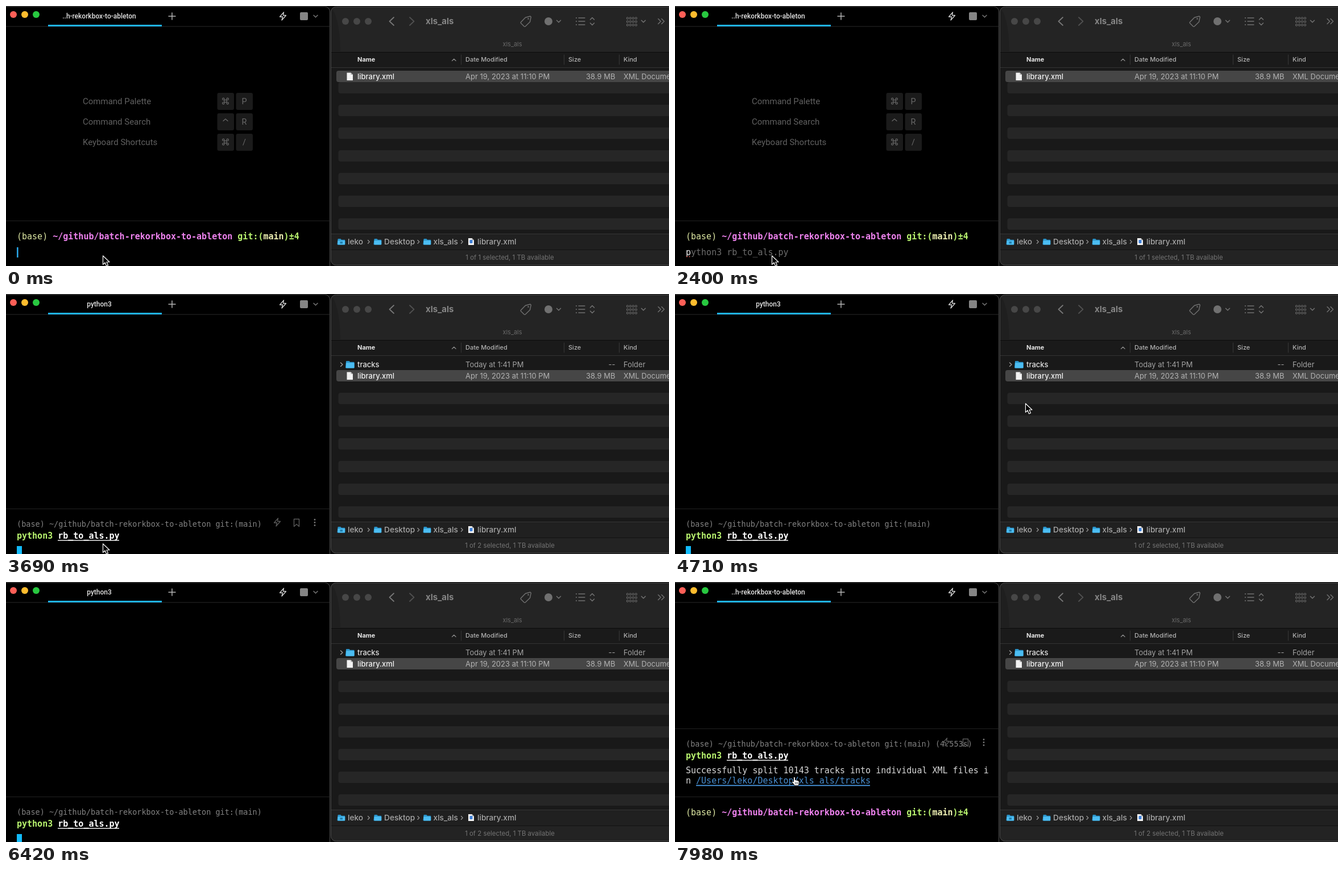
Write an HTML page that moves like this. It is 1166x458 px and loops after 8000 ms.

```html
<!DOCTYPE html>
<html lang="en">
<head>
<meta charset="utf-8">
<title>Terminal and file list</title>
<style>
html, body { margin: 0; width: 100%; height: 100%; overflow: hidden; background: #0b0b0b; }
svg { display: block; width: 1166px; height: 458px; }
text { white-space: pre; }
.ui { font-family: Inter, "Open Sans", sans-serif; }
.tab { font-family: Roboto, sans-serif; }
.mono { font-family: "DejaVu Sans Mono", monospace; font-size: 15px; }
.line { fill: none; stroke-linecap: round; stroke-linejoin: round; }
</style>
</head>
<body>
<svg id="stage" viewBox="0 0 1166 458" xmlns="http://www.w3.org/2000/svg"></svg>
<script>
const LOOP = 8000;
const T = { type: 2340, accept: 2610, enter: 2847, cursor: 3210, folder: 3420, leave: 4200, rest: 4650,
            hide: 5010, done: 7400, back: 7620 };
const USER = 'leko';
const PATH = '~/github/batch-rekorkbox-to-ableton';

const rect = (x, y, w, h, fill, r = 0, more = '') =>
  `<rect x="${x}" y="${y}" width="${w}" height="${h}" rx="${r}" fill="${fill}" ${more}/>`;
const text = (x, y, s, fill, size, cls = 'ui', more = '') =>
  `<text class="${cls}" x="${x}" y="${y}" fill="${fill}" style="font-size:${size}px" ${more}>${s}</text>`;
const line = (d, color, w = 1.4, more = '') =>
  `<path class="line" d="${d}" stroke="${color}" stroke-width="${w}" ${more}/>`;
const dot = (x, y, r, fill) => `<circle cx="${x}" cy="${y}" r="${r}" fill="${fill}"/>`;
const group = (id, body, hidden) => `<g id="${id}" ${hidden ? 'display="none"' : ''}>${body}</g>`;
const span = (s, fill, bold) =>
  `<tspan fill="${fill}" ${bold ? 'font-weight="700"' : ''}>${s}</tspan>`;
const mono = (x, y, body, more = '') => `<text class="mono" x="${x}" y="${y}" ${more}>${body}</text>`;
const MID = 'text-anchor="middle"', END = 'text-anchor="end"';
const down = (x, y, color) => line(`M${x - 3.5} ${y - 1.7}l3.5 3.5l3.5 -3.5`, color, 1.6);

const bolt = (x, y, color) =>
  line(`M${x + 1.5} ${y - 7}l-7 8h5l-1.5 6l7.5 -8.5h-5z`, color, 1.3);

function keyCap(x, y, label) {
  const cx = x + 14.5, cy = y + 14.5;
  let face;
  if (label === 'cmd') {
    const loop = (sx, sy) => `M${cx + sx * 2} ${cy + sy * 2}v${sy * 1.7}a1.7 1.7 0 1 ${sx * sy > 0 ? 0 : 1} ${sx * 1.7} ${-sy * 1.7}z`;
    face = line(loop(1, 1) + loop(1, -1) + loop(-1, 1) + loop(-1, -1) +
      `M${cx - 2} ${cy - 2}h4v4h-4z`, '#686868', 1.2);
  } else if (label === '^') {
    face = line(`M${cx - 4} ${cy - 1}l4 -3.5l4 3.5`, '#686868', 1.3);
  } else {
    face = text(cx, cy + 5, label, '#686868', 14.5, 'tab', MID);
  }
  return rect(x, y, 29.5, 30, '#1b1b1b', 3) + face;
}

const folder = (x, y, w, h) =>
  `<path d="M${x} ${y + 1}q0 -1 1 -1h${w * .33}l1.5 1.7h${w * .57 - 1.5}q1 0 1 1v${h - 3.7}q0 1 -1 1h${-w * .9 - 1}q-1 0 -1 -1z" fill="#2a94ca"/>` +
  rect(x, y + 3.2, w + .9 - w * .1 + 1, h - 3.2, '#4cbdf2', 1);

const sheet = (x, y, w, h) =>
  `<path d="M${x} ${y}h${w - 3.5}l3.5 3.5v${h - 3.5}h${-w}z" fill="#f2f2f2"/>` +
  `<path d="M${x + w - 3.5} ${y}v3.5h3.5z" fill="#a9a9a9"/>`;

function terminal() {
  const help = [['Command Palette', 'cmd', 'P'], ['Command Search', '^', 'R'], ['Keyboard Shortcuts', 'cmd', '/']];
  const helpRows = help.map(([label, a, b], i) => {
    const y = 153 + 36 * i;
    return text(135, y + 20, label, '#606060', 15, 'tab') + keyCap(371.5, y, a) + keyCap(404.5, y, b);
  }).join('');

  const prompt = mono(19, 411,
    span('(base) ', '#dfe9a4') + span(PATH, '#ee82ee', true) + span(' git:(', '#b9f46f', true) +
    span('main', '#f0f2b4', true) + span(')±4', '#b9f46f', true));

  const tools = bolt(477, 402, '#5a5a5a') +
    line('M506.5 396.5h9v13l-4.5 -4l-4.5 4z', '#5a5a5a', 1.4) +
    [397.5, 402.5, 407.5].map(y => dot(543, y, 1.4, '#747474')).join('');

  const block = line('M0 378.5H569', '#222222', 1) +
    mono(19, 410, span(`(base) ${PATH} git:(main)<tspan id="spent"></tspan>`, '#828282'), 'style="font-size:13.5px"') +
    mono(19, 431, span('python3 ', '#b9f46f', true) + span('rb_to_als.py', '#ffffff', true)) +
    rect(91, 433.3, 108, 1.4, '#ffffff') + group('tools', tools, true);

  const output = mono(19, 337, span('Successfully split 10143 tracks into individual XML files i', '#d8d8d8')) +
    mono(19, 355, span('n ', '#d8d8d8') + span(`/Users/${USER}/Desktop/xls_als/tracks`, '#4a8fd0')) +
    rect(37, 357.5, 306, 1.8, '#4a9ce8');

  const typed = mono(19, 439, span('p', '#f0f0f0') + span('ython3 rb_to_als.py', '#6c6c6c')) +
    line('M20 441.5H28', '#e8584f', 1.5, 'stroke-dasharray="2 2.5" style="stroke-linecap:butt"');
  const full = mono(19, 439, span('python3 ', '#b9f46f') + span('rb_to_als.py', '#f0f0f0')) +
    rect(91, 441, 108, 1.2, '#f0f0f0');

  return rect(-10, 1, 579.5, 470, '#000000', 9, 'stroke="#4c4c4c"') +
    line('M0 36H569', '#2b2b2b', 1) + rect(74, 33, 200, 3, '#1fb4f4') +
    dot(13, 15, 6, '#fe5f57') + dot(33, 15, 6, '#febc2e') + dot(53, 15, 6, '#28c840') +
    text(164, 22, '', '#e4e4e4', 12, 'tab', `id="title" font-weight="500" ${MID}`) +
    line('M286 18h12M292 12v12', '#b4b4b4', 1.5) + bolt(487, 18, '#d2d2d2') +
    rect(517, 11, 14, 14, '#858585', 2) + down(544.5, 18, '#737373') +
    group('help', helpRows) + group('block', block, true) + group('output', output, true) +
    group('prompt', line('M0 378.5H569', '#222222', 1) + prompt) +
    group('typed', typed, true) + group('full', full, true) +
    rect(19, 425, 2.6, 18, '#2aa5e6', 0, 'id="beam"') +
    rect(19, 444, 9, 14, '#12bbfb', 0, 'id="caret" display="none"');
}

function finder() {
  const gray = '#707070';
  const head = (x, s, bold) => text(x, 98, s, bold ? '#e6e6e6' : '#b2b2b2', 11, 'ui', `font-weight="${bold ? 700 : 500}"`);
  let stripes = '';
  for (let y = 134; y < 390; y += 40) stripes += rect(584.5, y, 600, 20, '#262626', 4);

  const cells = (y, name, date, size, kind, nameColor, color) =>
    text(618, y, name, nameColor, 13, 'ui', 'font-weight="500"') + text(808, y, date, color, 13) +
    text(1071.5, y, size, color, 13, 'ui', END) + text(1086, y, kind, color, 13);

  const file = rect(581, 114, 600, 20, '#464646', 4) + sheet(599.5, 117.5, 10.5, 13.5) +
    cells(129, 'library.xml', 'Apr 19, 2023 at 11:10 PM', '38.9 MB', 'XML Document', '#f2f2f2', '#b2b2b2');
  const tracks = line('M588.5 121l3.5 3.2l-3.5 3.2', '#a0a0a0', 1.4) + folder(598, 118, 14, 12.5) +
    cells(129, 'tracks', 'Today at 1:41 PM', '--', 'Folder', '#e2e2e2', '#a2a2a2');

  let grid = '';
  for (let i = 0; i < 4; i++)
    for (let j = 0; j < 3; j++)
      grid += rect(1091.5 + i * 5, 20 + j * 6, 3, 3, 'none', .6, `stroke="${gray}"`);
  const list = [21, 27, 33].map(y => dot(1003, y, 1.1, gray) + line(`M1007 ${y}h11`, gray, 1.3)).join('');

  const crumb = (x, s) => text(x, 420, s, '#a8a8a8', 13.7, 'ui', 'font-weight="500"');
  const next = x => line(`M${x - 1.5} 412.5l2.8 2.9l-2.8 2.9`, '#989898', 1.3);
  const crumbs = folder(583.5, 410, 12, 10.5) + rect(587.5, 415, 4.5, 3.5, '#217fae') + crumb(601, USER) + next(638) +
    folder(647.5, 410, 12, 10.5) + crumb(665, 'Desktop') + next(725.5) +
    folder(734.5, 410, 12, 10.5) + crumb(751.5, 'xls_als') + next(802) +
    sheet(813, 409, 10, 12) + rect(815.5, 412, 5, 6, '#3f80d8', 1) + crumb(829, 'library.xml');

  return `<clipPath id="win"><rect x="571.5" y="1" width="620" height="456" rx="9"/></clipPath>` +
    `<g clip-path="url(#win)">` +
    rect(571, 1, 595, 457, '#191919') + rect(571, 1, 595, 80, '#242424') +
    `<path d="M571 1Q587 20 588 80H571z" fill="#1f1f1f"/>` +
    rect(571, 81, 595, 27, '#1a1a1a') + stripes +
    line('M571 81.5H1166', '#0b0b0b', 1) + line('M571 108.5H1166', '#343434', 1) +
    [800.5, 981.5, 1078.5].map(x => line(`M${x} 86V103`, '#373737', 1)).join('') +
    rect(571, 401, 595, 57, '#202020') + line('M571 401.5H1166', '#363636', 1) +
    rect(571, 430, 595, 28, '#232323') + line('M571 429.5H1166', '#121212', 1) +
    '</g>' + rect(571.5, 1.5, 620, 455, 'none', 9, 'stroke="#4a4a4a"') +
    [597, 617, 637].map(x => dot(x, 27, 6, '#474747')).join('') +
    line('M682 20l-7.5 7l7.5 7', '#777777', 1.8) + line('M710 20l7.5 7l-7.5 7', '#505050', 1.8) +
    text(738, 32, 'xls_als', '#858585', 15, 'ui', 'font-weight="700"') +
    line('M905.5 28.5l8 -8.3l8.5 -2.2l1.3 1.3l-1.8 8.8l-8.2 7.9q-1 .8 -2 0l-5.8 -5.7q-.8 -.8 0 -1.8z', gray, 1.4) +
    dot(918.5, 22.5, 1.2, gray) +
    dot(954, 27, 7, gray) + down(972, 27, gray) + list +
    line('M1027.5 24l3.5 -3.5l3.5 3.5M1027.5 30l3.5 3.5l3.5 -3.5', gray, 1.6) +
    grid + down(1121, 27, gray) +
    line('M1147 22.5l4.5 4.5l-4.5 4.5M1153 22.5l4.5 4.5l-4.5 4.5', gray, 1.5) +
    text(890.5, 71, 'xls_als', '#6a6a6a', 11, 'ui', MID) +
    head(618, 'Name', true) + line('M784.5 96.5l3.3 -3.2l3.3 3.2', '#8c8c8c', 1.2) +
    head(808, 'Date Modified') + head(989, 'Size') + head(1086, 'Kind') +
    group('tracks', tracks, true) + group('file', file) + crumbs +
    text(886, 447, '', '#747474', 11.4, 'ui', `id="status" ${MID}`);
}

const pointer = group('arrow',
    '<path d="M.5 0V15.4L4.1 12L6.6 18L9.5 16.8L7 11H12z" fill="#000" stroke="#fff" stroke-width="1.2" stroke-linejoin="round"/>') +
  group('hand',
    '<path d="M3 9V1.8Q3 .3 4.4 .3T5.8 1.8V6Q7.4 5 8.2 6.4Q9.8 5.6 10.6 7.1Q12.8 6.6 12.8 9V11Q12.8 13.6 11.2 15.8H4.8Q3.9 13.4 1.2 11Q-.4 9.2 .9 8.4Q2 8 3 9z" fill="#fff" stroke="#000" stroke-width="1"/>' +
    line('M6.2 9.5v3.5M8.4 9.5v3.5M10.5 9.5v3.5', '#333', .8), true);

const stage = document.getElementById('stage');
stage.innerHTML = rect(0, 0, 1166, 458, '#0b0b0b') + terminal() + finder() + pointer;
const el = {};
stage.querySelectorAll('[id]').forEach(n => el[n.id] = n);

const show = (id, on) => el[id].setAttribute('display', on ? 'inline' : 'none');
const move = (id, x, y) => el[id].setAttribute('transform', `translate(${x} ${y})`);
const label = (id, s) => { if (el[id].textContent !== s) el[id].textContent = s; };
const ease = (t, a, b) => {
  const k = Math.min(1, Math.max(0, (t - a) / (b - a)));
  return k * k * (3 - 2 * k);
};

function pointerAt(t) {
  if (t < T.hide) {
    const k = ease(t, T.leave, T.rest);
    return [170 + 446 * k, 440 - 247 * k];
  }
  const k = ease(t, T.done, T.back);
  return [330 - 124.5 * k, 300 + 43 * k];
}

function draw(t) {
  const running = t >= T.enter && t < T.done, done = t >= T.done;
  const typing = t >= T.type && t < T.enter, hasFolder = t >= T.folder;
  const [x, y] = pointerAt(t);
  const seen = t < T.hide || done;
  const onLink = done && x < 343 && y > 338;

  label('title', running ? 'python3' : '..h-rekorkbox-to-ableton');
  label('spent', done ? ' (4.553s)' : '');
  label('status', `1 of ${hasFolder ? 2 : 1} selected, 1 TB available`);

  show('help', t < T.enter);
  show('prompt', !running);
  show('block', running || done);
  move('block', 0, done ? -120 : 0);
  show('output', done);
  show('tools', seen && x < 569 && y > (done ? 258 : 378));
  show('typed', typing && t < T.accept);
  show('full', typing && t >= T.accept);
  show('caret', running && t >= T.cursor);

  // The beam blinks with a one second period, restarted by the new prompt.
  const phase = done ? t - T.done : t + 280;
  show('beam', !running && phase % 1000 < 500);
  move('beam', !typing ? 0 : t < T.accept ? 9 : 180.6, 0);

  show('tracks', hasFolder);
  move('file', 0, hasFolder ? 20 : 0);

  show('arrow', seen && !onLink);
  show('hand', seen && onLink);
  move('arrow', x, y);
  move('hand', x, y);
}

function tick() {
  draw(performance.now() % LOOP);
  requestAnimationFrame(tick);
}
tick();
</script>
</body>
</html>
```
